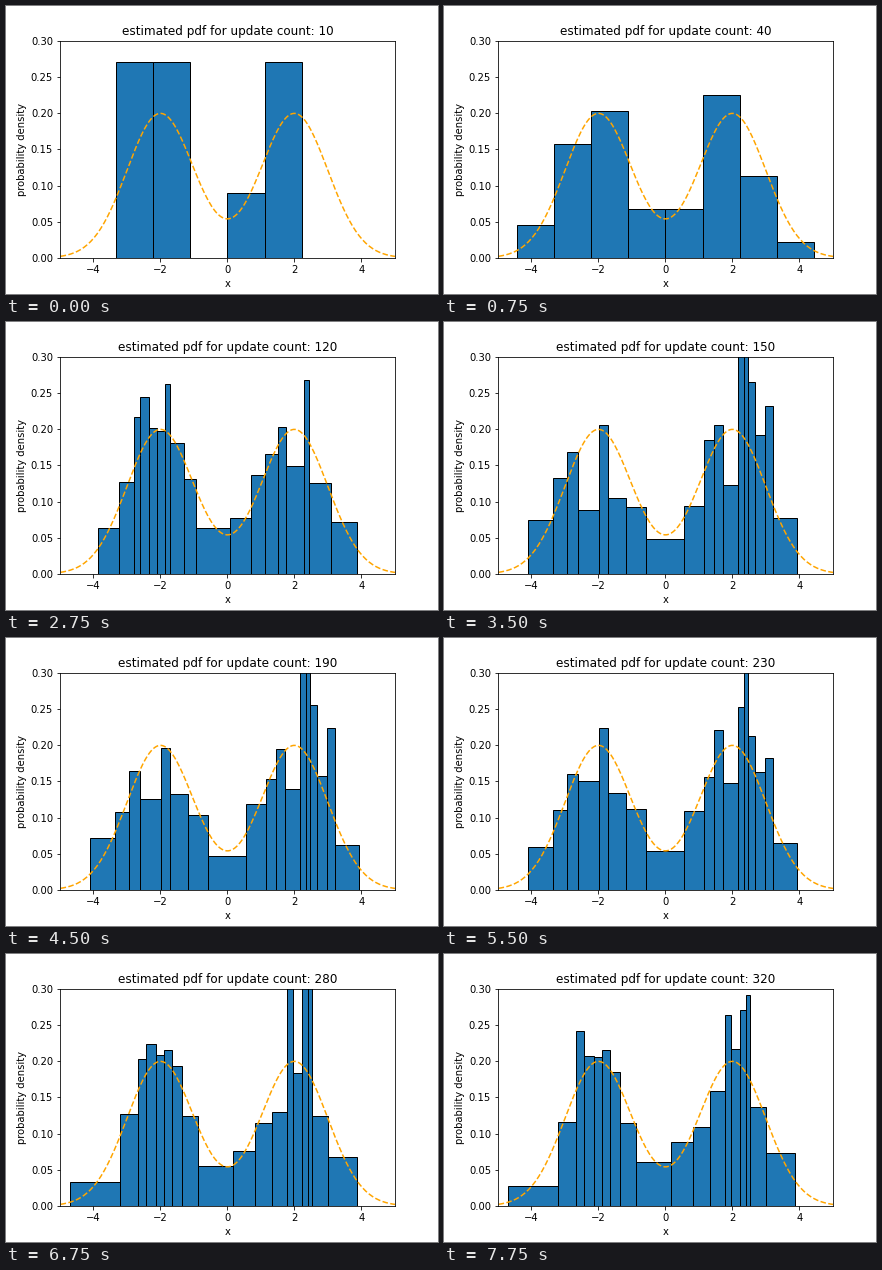
A matplotlib script that plays this animation: 432 px wide and 288 px high, repeating every 8000 ms.

```python
import numpy as np
import matplotlib.pyplot as plt
from matplotlib.animation import FuncAnimation

FRAMES, INTERVAL, BATCH = 32, 250, 10
MIN_RATE = 0.01                  # the estimate forgets older samples
GOLDEN = (np.sqrt(5) - 1) / 2


def pdf(x):
    bell = lambda mu: np.exp(-(x - mu) ** 2 / 2) / np.sqrt(2 * np.pi)
    return 0.5 * bell(-2) + 0.5 * bell(2)


class Bins:
    """Histogram that learns from one sample per update."""

    def __init__(self, edges, masses=None):
        self.edges = np.array(edges)
        self.widths = np.diff(self.edges)
        size = len(self.widths)
        self.masses = np.full(size, 1 / size) if masses is None else masses
        centers = (self.edges[1:] + self.edges[:-1]) / 2
        chance = pdf(centers) * self.widths
        self.cumulative = np.cumsum(chance / chance.sum())

    def heights(self, start, n):
        masses = self.masses.copy()
        for t in range(start + 1, n + 1):
            rate = max(1 / t, MIN_RATE)
            # evenly spread samples, mapped to bins by their probability
            hit = np.searchsorted(self.cumulative[:-1], t * GOLDEN % 1)
            masses *= 1 - rate
            masses[hit] += rate
        return masses / self.widths


# Uniform bins first, then bins of equal mass rebuilt every 100 updates
STAGES = {
    10: Bins(10 / 9 * np.arange(-4, 5),
             np.array([0, 3, 3, 0, 1, 3, 0, 0]) / 10),
    50: Bins([-3.86, -3.24, -2.79, -2.61, -2.34, -2.10, -1.86, -1.71, -1.30,
              -0.94, 0.08, 0.70, 1.12, 1.51, 1.75, 2.29, 2.44, 3.09, 3.87]),
    150: Bins([-4.10, -3.36, -2.94, -2.61, -1.98, -1.71, -1.18, -0.58, 0.56,
               1.15, 1.45, 1.72, 2.17, 2.35, 2.47, 2.68, 2.97, 3.21, 3.93]),
    250: Bins([-4.70, -3.21, -2.67, -2.43, -2.13, -1.89, -1.66, -1.36, -0.88,
               0.17, 0.82, 1.33, 1.78, 1.96, 2.23, 2.41, 2.53, 3.00, 3.87]),
}


def histogram(n):
    start = max(s for s in STAGES if s <= n)
    bins = STAGES[start]
    heights = bins.heights(start, n)
    used = np.flatnonzero(heights)
    lo, hi = used[0], used[-1] + 1
    return bins.edges[lo:hi + 1], heights[lo:hi]


fig, ax = plt.subplots(figsize=(6, 4), dpi=72)
fig.subplots_adjust(left=0.125, right=0.9, bottom=0.125, top=0.88)
grid = np.linspace(-10, 10, 400)


def draw(frame):
    n = BATCH * (frame + 1)
    edges, heights = histogram(n)
    ax.clear()
    ax.bar(edges[:-1], heights, np.diff(edges), align="edge",
           color="#1f77b4", edgecolor="black", linewidth=1)
    ax.plot(grid, pdf(grid), "--", color="orange", linewidth=1.5)
    ax.set(xlim=(-5, 5), ylim=(0, 0.3), xlabel="x",
           ylabel="probability density",
           title=f"estimated pdf for update count: {n}")


anim = FuncAnimation(fig, draw, frames=FRAMES, interval=INTERVAL,
                     init_func=lambda: None, repeat=True, repeat_delay=0)
plt.show()
```
